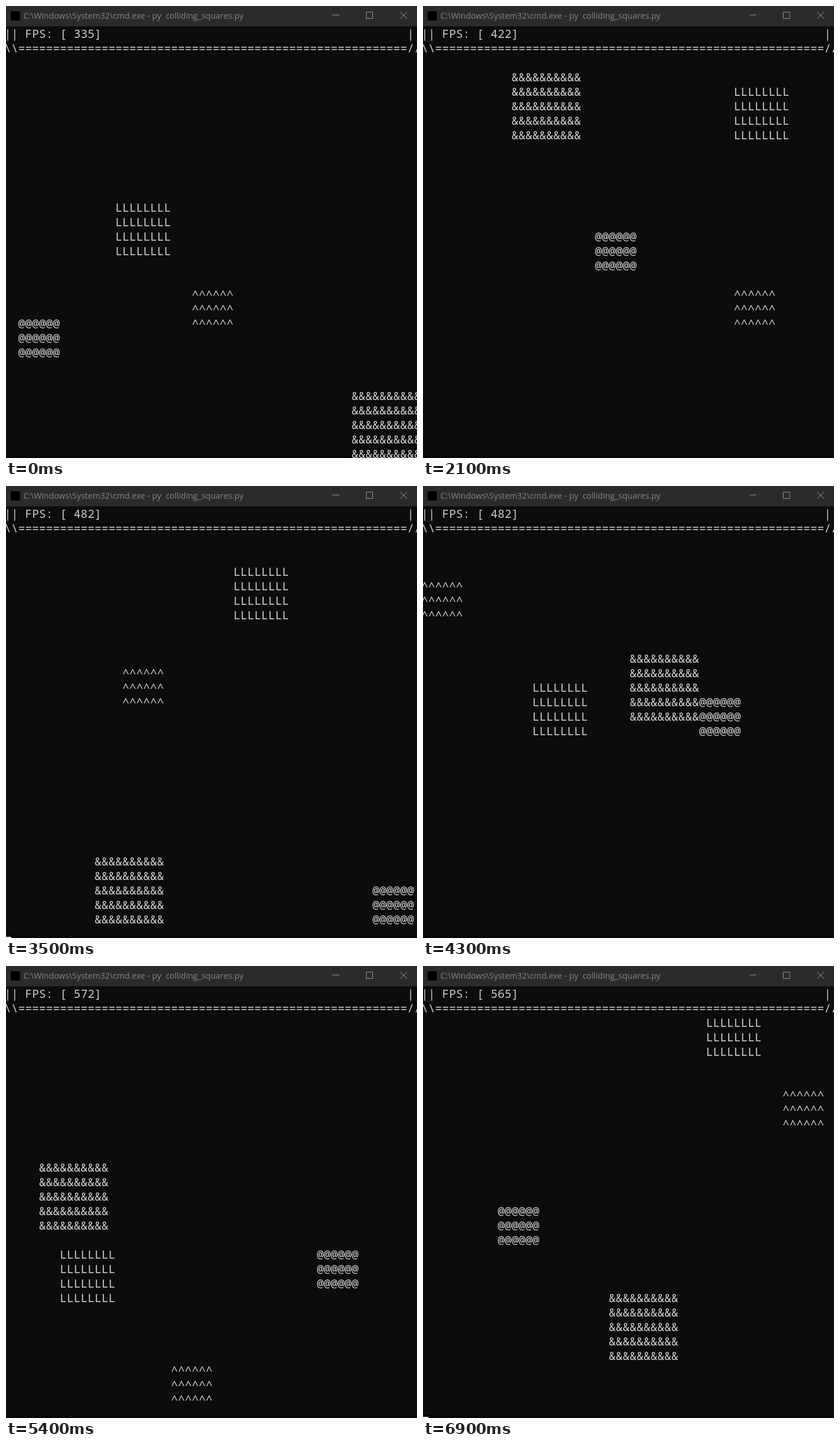
Recreate the animation shown at these times as an HTML page with a canvas. Size 710x780 px, loop 7000 ms.

```html
<!DOCTYPE html>
<html lang="en">
<head>
<meta charset="utf-8">
<title>Colliding squares</title>
<style>
  html, body { margin: 0; width: 100%; height: 100%; overflow: hidden; background: #0c0c0c; }
  canvas { display: block; }
</style>
</head>
<body>
<canvas id="stage" width="710" height="780"></canvas>
<script>
const ctx = document.getElementById('stage').getContext('2d');
const LOOP = 7000, FRAME = 100, DT = 5;
const COLS = 61, ROWS = 31, COL = 12, ROW = 25, LEFT = -3, BASE = 55;
const rates = [335, 445, 422, 458, 482, 541, 572, 565];

// Speed in cells per second: it climbs, then levels off.
const speed = t => Math.min(22.2, 16.05 + 0.00137 * t);

const cell = Math.floor;

function move(s, pos, vel, max, d) {
  s[pos] += s[vel] * d;
  if (s[pos] < 0) { s[pos] = -s[pos]; s[vel] = 1; }
  if (s[pos] > max) { s[pos] = 2 * max - s[pos]; s[vel] = -1; }
}

const meets = (a, b, pos, size) =>
  cell(a[pos]) < cell(b[pos]) + b[size] && cell(b[pos]) < cell(a[pos]) + a[size];

function turnAway(s, other) {
  s.vx = cell(s.x) < cell(other.x) ? -1 : 1;
  s.vy = cell(s.y) < cell(other.y) ? -1 : 1;
}

function advance(squares, d) {
  for (const s of squares) {
    move(s, 'x', 'vx', COLS - s.w, d);
    move(s, 'y', 'vy', ROWS - s.h, d);
  }
  squares.forEach((a, i) => squares.slice(i + 1).forEach(b => {
    if (meets(a, b, 'x', 'w') && meets(a, b, 'y', 'h')) {
      turnAway(a, b);
      turnAway(b, a);
    }
  }));
}

function simulate() {
  const squares = [
    { ch: 'L', w: 8, h: 4, x: 16.9, y: 12.3, vx: -1, vy: 1 },
    { ch: '^', w: 6, h: 3, x: 27.97, y: 18.55, vx: 1, vy: -1 },
    { ch: '@', w: 6, h: 3, x: 2.74, y: 20.38, vx: 1, vy: -1 },
    { ch: '&', w: 10, h: 5, x: 50.65, y: 25.512, vx: -1, vy: 1 }
  ];
  const frames = [];
  for (let t = 0; t < LOOP; t += DT) {
    if (t % FRAME === 0) frames.push(squares.map(s => ({ ...s })));
    advance(squares, speed(t + DT / 2) * DT / 1000);
  }
  return frames;
}

function box(color, x, y, w, h) {
  ctx.fillStyle = color;
  ctx.fillRect(x, y, w, h);
}

function print(text, col, row) {
  ctx.fillText(text, LEFT + col * COL, BASE + row * ROW);
}

function titleBar() {
  box('#2b2b2b', 0, 0, 710, 35);
  box('#000', 8, 9, 16, 16);
  ctx.fillStyle = '#858585';
  ctx.font = '14.36px "Open Sans", sans-serif';
  ctx.fillText('C:\\Windows\\System32\\cmd.exe - py  colliding_squares.py', 30, 22);
  ctx.strokeStyle = '#969696';
  ctx.lineWidth = 1;
  ctx.beginPath();
  ctx.moveTo(564, 15.5); ctx.lineTo(576, 15.5);
  ctx.rect(622.5, 10.5, 11, 11);
  ctx.moveTo(681, 10); ctx.lineTo(693, 22);
  ctx.moveTo(693, 10); ctx.lineTo(681, 22);
  ctx.stroke();
}

function draw(index) {
  const t = index * FRAME;
  box('#0c0c0c', 0, 0, 710, 780);
  box('#070707', 0, 776, 710, 4);

  ctx.font = '20px "Noto Sans Mono", monospace';
  ctx.fillStyle = '#ccc';
  for (const s of frames[index]) {
    for (let r = 0; r < s.h; r++) {
      const row = cell(s.y) + r;
      if (row > 1) print(s.ch.repeat(s.w), cell(s.x), row);
    }
  }

  const fps = rates[Math.floor((t + 600) / 1000)];
  print(`|| FPS: [ ${fps}]`.padEnd(58) + '||', 0, 0);
  print('\\\\' + '='.repeat(56) + '//', 0, 1);

  const blink = t % 1085;
  if (blink > 5 && blink < 545) box('#f2f2f2', 0, 778, 9, 2);

  titleBar();
}

const frames = simulate();
const start = performance.now();

function tick() {
  const t = (performance.now() - start) % LOOP;
  draw(Math.floor(t / FRAME));
  requestAnimationFrame(tick);
}
tick();
</script>
</body>
</html>
```
